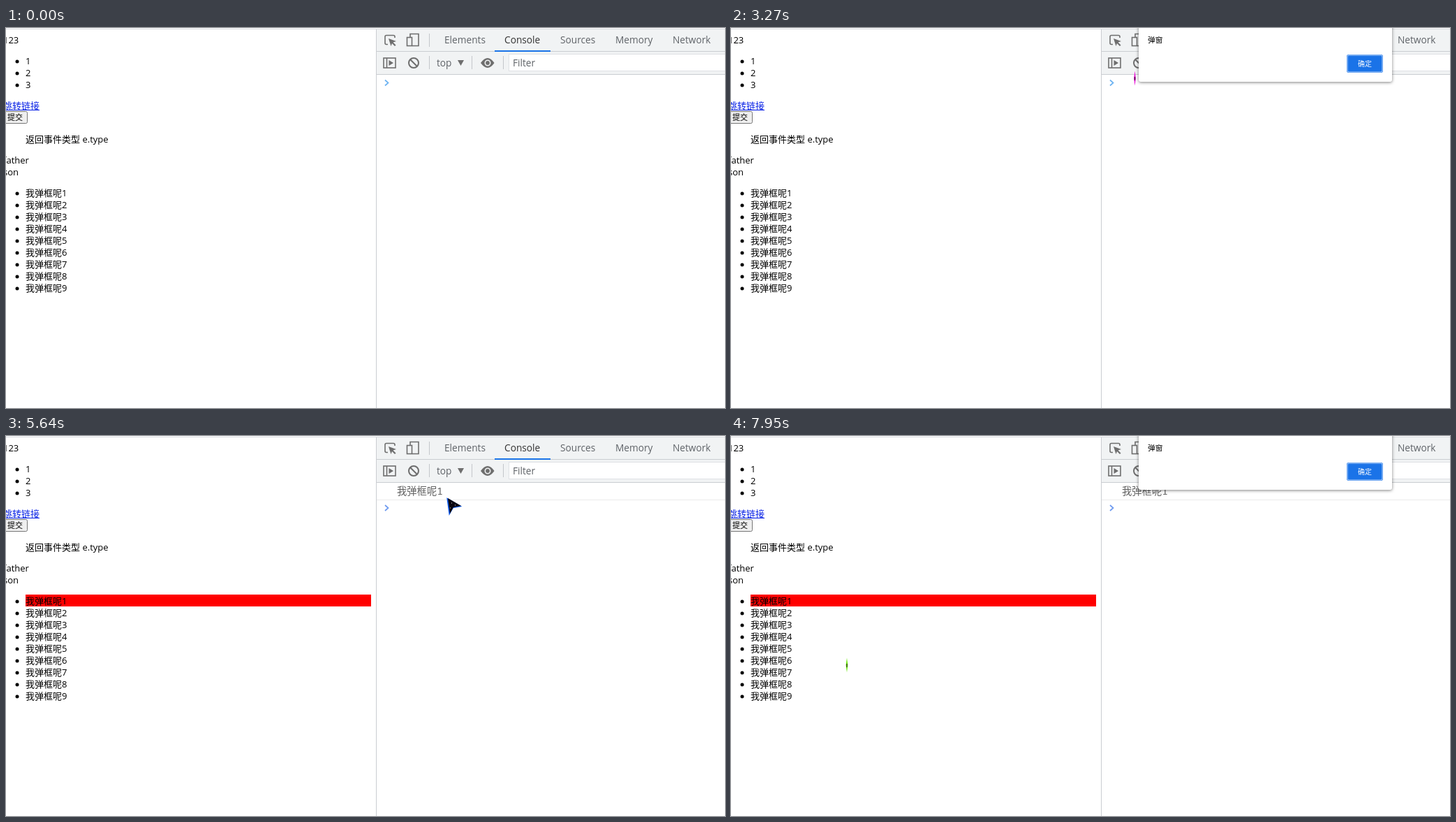
Recreate the animation shown at these times as an HTML page. Size 1030x544 px, loop 8000 ms.

```html
<!DOCTYPE html>
<html lang="zh-CN">
<head>
<meta charset="utf-8">
<title>Event delegation</title>
<style>
  html, body { margin: 0; width: 100%; height: 100%; overflow: hidden; background: #fff; }
  svg { display: block; width: 1030px; height: 544px; }
  text { font-family: "Open Sans", "Noto Sans CJK SC", "Noto Sans CJK", sans-serif; font-size: 13px; white-space: pre; }
  .tool text { font-size: 13.7px; fill: #5f6368; }
  .tool text.on { fill: #333; }
  .icon { fill: none; stroke: #6e6e6e; stroke-width: 1.6; }
  .solid { fill: #6e6e6e; stroke: none; }
  .log { font-family: "Noto Sans Mono", "Noto Sans CJK SC", "Noto Sans CJK", monospace; font-size: 14.3px; fill: #606060; }
  .panel { fill: #fff; filter: drop-shadow(0 1px 2px rgba(0, 0, 0, .5)); }
</style>
</head>
<body>
<svg viewBox="0 0 1030 544">
  <rect id="mark" x="28" y="227" width="495" height="17" fill="#f00"/>
  <g id="page">
    <path d="M-4 117.5H48" stroke="#0b24e6"/>
    <rect x="-4.5" y="119.5" width="35" height="17" rx="2" fill="#efefef" stroke="#767676"/>
    <text x="2" y="132" style="font-size:11px">提交</text>
  </g>

  <g class="tool">
    <rect x="530" y="1" width="500" height="65" fill="#f1f3f4"/>
    <path d="M0 1.5H1030" stroke="#dadce0"/>
    <path d="M530 33.5H1030M530 66.5H1030M530.5 2V544" stroke="#cacdd1"/>
    <rect x="700" y="32" width="80" height="2" fill="#1a73e8"/>
    <rect x="720.5" y="37.5" width="320" height="24" fill="#fff" stroke="#dfe1e5"/>
    <path d="M606.5 8V27M606.5 40V59M667.5 40V59M712.5 40V59" stroke="#c4c7cb"/>
    <g class="icon">
      <path d="M547 23.5H545Q543 23.5 543 21.5V12.5Q543 10.5 545 10.5H555Q557 10.5 557 12.5V14"/>
      <path class="solid" d="M548 15L559 19L554.5 20.5L558.5 24.5L557 26L553 22L551.5 26Z"/>
      <path d="M579 13V8.5H591V25.5H582"/>
      <rect x="574.5" y="13.5" width="7" height="12"/>
      <rect x="541" y="43" width="17" height="14"/>
      <path d="M545.5 43V57"/>
      <path class="solid" d="M548.5 46L555 50L548.5 54Z"/>
      <circle cx="584" cy="50" r="7" stroke-width="2"/>
      <path d="M579 45L589 55" stroke-width="2"/>
      <path class="solid" d="M647 46H656L651.5 54Z"/>
      <path class="solid" d="M680 50Q690 36 699.5 50Q690 64 680 50Z"/>
      <circle cx="690" cy="50" r="3.7" fill="#6e6e6e" stroke="#f1f3f4"/>
    </g>
  </g>

  <g id="log">
    <text class="log" x="560" y="84">我弹框呢1</text>
    <path d="M531 91.5H1030" stroke="#ececec"/>
  </g>
  <path id="prompt" d="M543 74.5L547.5 78.5L543 82.5" fill="none" stroke-width="1.7"/>

  <g id="dialog">
    <path class="panel" d="M584 -30H947V74Q947 77 944 77H587Q584 77 584 74Z"/>
    <text x="597" y="21" style="font-size:10.7px">弹窗</text>
    <rect x="882" y="38" width="52" height="26" rx="3" fill="#1a73e8"/>
    <rect id="ring" x="883" y="39" width="50" height="24" rx="2" fill="none" stroke="#c4dcfb"/>
    <text x="908" y="55" text-anchor="middle" style="font-size:10px" fill="#fff">确定</text>
  </g>

  <g id="cursor">
    <g id="arrow">
      <path class="tint" d="M-9-11L10 0L-1 2L-6 11Z" transform="translate(-.8 .6)" stroke-width="1.5"/>
      <path d="M-9-11L10 0L-1 2L-6 11Z" fill="#0a0610"/>
      <path d="M-4-4h1M-6 3h1M1-1h1" stroke="#ddd"/>
    </g>
    <g id="beam">
      <path class="tint" d="M0-10.5L1.4 0L0 10.5L-1.4 0Z" stroke-width="0"/>
      <path d="M0-2V3" stroke="#201018"/>
    </g>
  </g>
</svg>
<script>
const LOOP = 8000, START = 490, TICK = 69.4;
const $ = id => document.getElementById(id);

function add(parent, tag, attrs, text = '') {
  const el = document.createElementNS('http://www.w3.org/2000/svg', tag);
  for (const k in attrs) el.setAttribute(k, attrs[k]);
  el.textContent = text;
  parent.append(el);
}

const page = $('page'), tool = document.querySelector('.tool');
const label = (x, y, s, fill = '#000') => add(page, 'text', { x, y: y + 4.5, fill }, s);
function item(y, s) {
  add(page, 'circle', { cx: 16, cy: y + 1, r: 2.5 });
  label(28, y, s);
}

label(-4, 17, '123');
for (let i = 0; i < 3; i++) item(47 + 17 * i, i + 1);
label(-4, 111, '跳转链接', '#0b24e6');
label(28, 159, '返回事件类型 e.type');
label(-4, 189, 'father');
label(-4, 206, 'son');
for (let i = 0; i < 9; i++) item(236 + 17 * i, '我弹框呢' + (i + 1));

[[628, 'Elements'], [714, 'Console'], [794, 'Sources'], [873, 'Memory'], [955, 'Network']]
  .forEach(([x, s]) => add(tool, 'text', { x, y: 22, class: s === 'Console' ? 'on' : '' }, s));
add(tool, 'text', { x: 617, y: 55 }, 'top');
add(tool, 'text', { x: 726, y: 55 }, 'Filter');

const clamp = p => Math.min(1, Math.max(0, p));
const easeOut = p => 1 - (1 - p) ** 3;
const easeInOut = p => p * p * (3 - 2 * p);

// Pointer strokes: start, end, easing, Bézier points
const strokes = [
  [500, 1310, easeOut, [420, 522], [58, 230]],
  [2990, 3350, easeInOut, [58, 230], [373, 172], [630, 48]],
  [3830, 4670, easeInOut, [630, 48], [900, 68]],
  [4810, 5300, easeInOut, [900, 68], [880, 125], [642, 100]],
  [5710, 6340, easeInOut, [642, 100], [680, 525], [457, 350], [107, 265]],
  [6340, 6620, easeInOut, [107, 265], [39, 324]],
  [7740, 7930, easeInOut, [39, 324], [166, 328]]
];

function bezier(pts, u) {
  if (pts.length === 1) return pts[0];
  const next = pts.slice(1).map((b, i) => b.map((v, k) => pts[i][k] + (v - pts[i][k]) * u));
  return bezier(next, u);
}

function pointer(t) {
  const [from, to, ease, ...pts] = strokes.filter(s => s[0] <= t).pop() || strokes[0];
  return bezier(pts, ease(clamp((t - from) / (to - from))));
}

// The alert opens, is confirmed, and opens again.
const ramp = (t, from) => clamp((t - from) / 210);
const opened = t => ramp(t, 1890) - ramp(t, 4745) + ramp(t, 7320);

const show = (id, on) => $(id).setAttribute('display', on ? 'inline' : 'none');
const tints = document.querySelectorAll('.tint');

function draw(now) {
  const t = START + (Math.floor((now % LOOP - START) / TICK) + .2) * TICK;
  const [x, y] = pointer(t), hidden = 1 - opened(t);
  const logged = t >= 4870;
  const beam = (t >= 1410 && t < 3340) || t >= 6620;

  show('cursor', t >= START);
  show('arrow', !beam);
  show('beam', beam);
  $('cursor').setAttribute('transform', `translate(${x} ${y})`);
  const hue = 310 + .574 * (t - 780);
  tints.forEach(el => {
    el.style.fill = el.style.stroke = `hsl(${hue} 90% 48%)`;
  });

  show('mark', logged);
  show('log', logged);
  $('prompt').setAttribute('transform', `translate(0 ${logged ? 24.5 : 0})`);
  $('prompt').setAttribute('stroke', logged ? '#6f9bef' : '#6db3f2');

  $('dialog').setAttribute('transform', `translate(0 ${-13 * hidden})`);
  $('dialog').setAttribute('opacity', 1 - hidden ** 2.5);
  show('ring', t < 4740 || t > 7000);
}

function loop() {
  draw(performance.now());
  requestAnimationFrame(loop);
}
loop();
</script>
</body>
</html>
```
